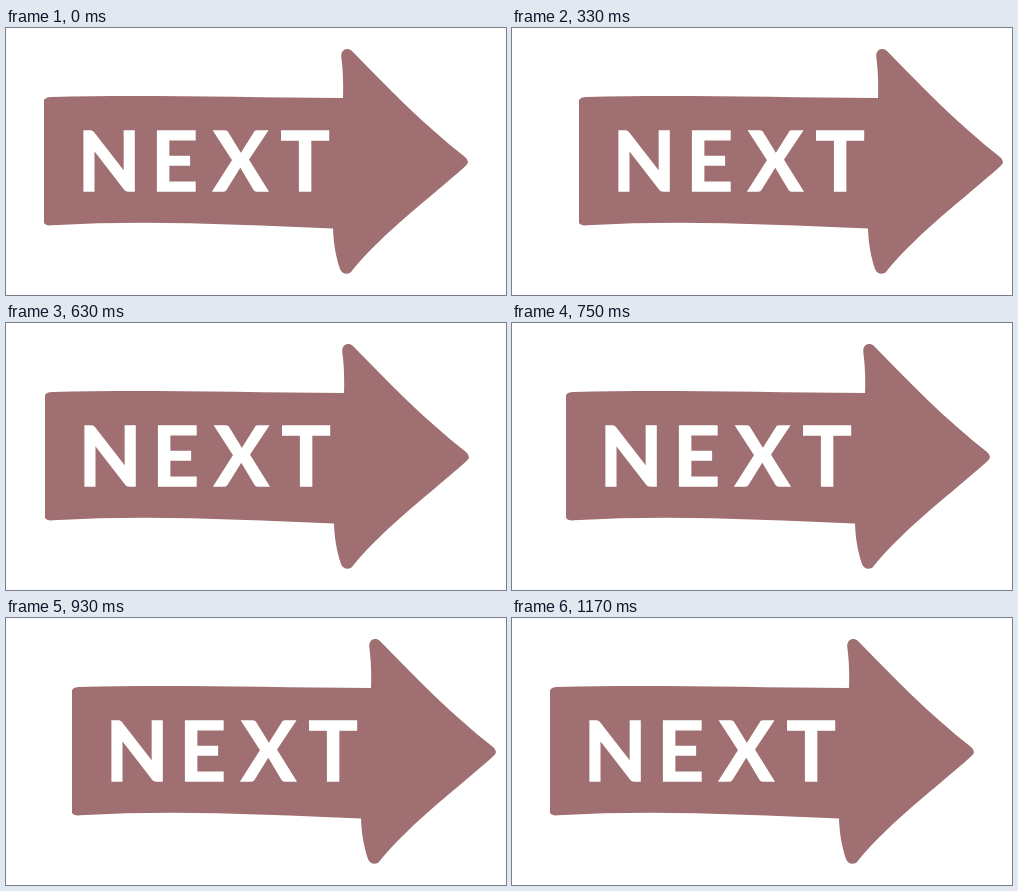
Write an HTML page that moves like this. It is 500 px wide and 267 px high and loops after 1260 ms.

```html
<!DOCTYPE html>
<html lang="en">
<head>
<meta charset="utf-8">
<title>Next</title>
<style>
  html, body { margin: 0; width: 100%; height: 100%; overflow: hidden; background: #fff; }
  svg { display: block; width: 500px; height: 267px; }
  path { fill: #a06f71; }
  text {
    font: 700 82px Lato, sans-serif;
    fill: #fff;
    stroke: #fff;
    stroke-width: 1.4px;
    text-anchor: middle;
  }
</style>
</head>
<body>
<svg viewBox="0 0 500 267">
  <g id="arrow">
    <path d="M38 72 Q40 69 45 69 C140 66.500 230 69.500 337 70
      C337.500 55 337 42 335.300 29 C334.500 22 341 18.500 346 23
      C380 58 418 97 459 129 Q465 134 459 138.500
      C424 170 380 202 346.500 242 C343.500 247.500 336 247 334 241
      C330 229 327.500 216 327 200.500
      C230 196.500 140 191.500 46 197.300 Q40 198 38 195 Z"/>
    <text y="162.500" x="103 168.500 234.500 299">NEXT</text>
  </g>
</svg>
<script>
  const LOOP = 1260, STEP = 30, LAST = 1170, SWING = 594, REACH = 30;
  const arrow = document.getElementById('arrow');
  const start = performance.now();

  // Whole-pixel sine swing, held at the end of the loop
  function draw() {
    const time = (performance.now() - start) % LOOP;
    const t = Math.min(Math.floor(time / STEP) * STEP, LAST);
    const x = Math.floor(REACH / 2 * (1 - Math.cos(2 * Math.PI * t / SWING)));
    arrow.setAttribute('transform', `translate(${x} 0)`);
    requestAnimationFrame(draw);
  }
  draw();
</script>
</body>
</html>
```
